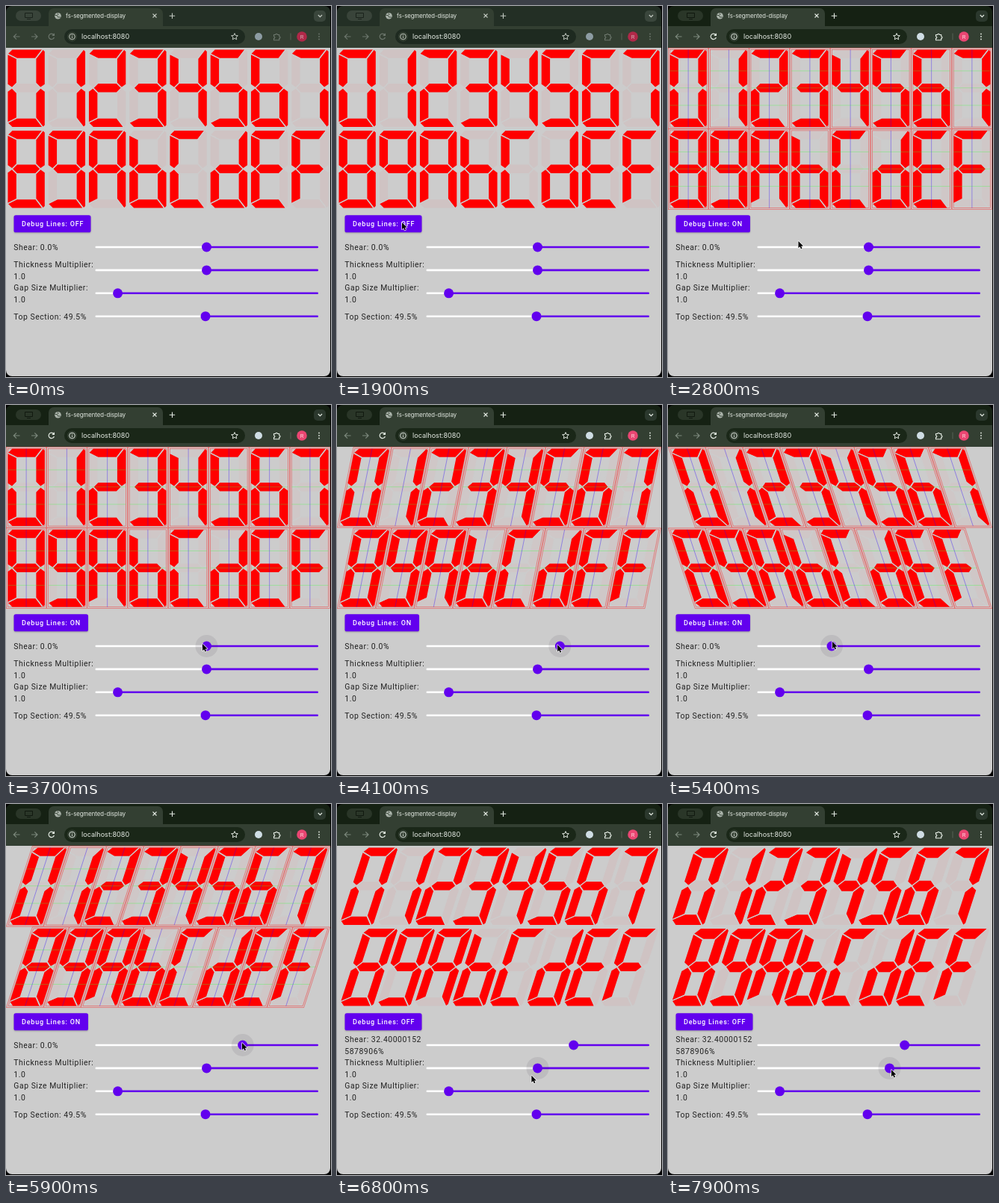
Write an HTML page with a canvas that moves like this. It is 435 px wide and 497 px high and loops after 8 s.

```html
<!DOCTYPE html>
<html lang="en">
<head>
<meta charset="utf-8">
<title>fs-segmented-display</title>
<style>
html, body { margin: 0; width: 100%; height: 100%; overflow: hidden; background: #000; }
canvas { display: block; }
</style>
</head>
<body>
<canvas id="stage" width="435" height="497"></canvas>
<script>
const ctx = document.getElementById('stage').getContext('2d');
const LOOP = 8000, STEP = 100;
const W = 434, CELL_H = 108.5, TOP = 56, INSET = 1.7, THICK = 12.9, SPLIT = 0.495;
const PAGE = '#cccccc', PURPLE = '#6200ee';
const SHEAR_MID = 268.5, HALF_TRACK = 149;
const FOCUS = 2000, DEBUG_ON = 2500, DEBUG_OFF = 6400;

// Lit segments of 0-9, A, b, C, d, E, F
const DIGITS = ['abcdef', 'bc', 'abdeg', 'abcdg', 'bcfg', 'acdfg', 'acdefg', 'abc',
  'abcdefg', 'abcdfg', 'abcefg', 'cdefg', 'adef', 'bcdeg', 'adefg', 'aefg'];

// Keyframes: time, then values
const POINTER = [[700, 408, 380], [1300, 244, 260], [1450, 244, 260], [1900, 87, 290],
  [2500, 87, 290], [3100, 262, 340], [3500, 263, 320], [3700, 263, 320], [4600, 340, 323],
  [4700, 337, 324], [5300, 216, 317], [5400, 220, 317], [5900, 316, 320], [6300, 62, 292],
  [6500, 62, 292], [6850, 272, 368], [7100, 272, 357], [7900, 299, 356]];
const SHEAR = [[3700, SHEAR_MID], [4600, 340], [4700, 337], [5300, 215], [5400, 219], [5900, 316.7]];
const THICKNESS = [[7100, 268.5], [7900, 296.5]];

function track(keys, t) {
  if (t <= keys[0][0]) return keys[0].slice(1);
  const i = keys.findIndex(k => k[0] > t);
  if (i < 0) return keys[keys.length - 1].slice(1);
  const a = keys[i - 1], b = keys[i];
  const u = (t - a[0]) / (b[0] - a[0]), e = u * u * (3 - 2 * u);
  return a.slice(1).map((v, n) => v + (b[n + 1] - v) * e);
}

function poly(points, fill, stroke, width = 1) {
  ctx.beginPath();
  points.forEach(([x, y]) => ctx.lineTo(x, y));
  ctx.closePath();
  if (fill) { ctx.fillStyle = fill; ctx.fill(); }
  if (stroke) { ctx.strokeStyle = stroke; ctx.lineWidth = width; ctx.stroke(); }
}

function box(x, y, w, h, r, fill) {
  ctx.beginPath();
  ctx.roundRect(x, y, w, h, r);
  ctx.fillStyle = fill;
  ctx.fill();
}

function disc(x, y, r, fill) {
  ctx.beginPath();
  ctx.arc(x, y, r, 0, 2 * Math.PI);
  ctx.fillStyle = fill;
  ctx.fill();
}

function line(d, color, width = 1.1) {
  ctx.strokeStyle = color;
  ctx.lineWidth = width;
  ctx.stroke(new Path2D(d));
}

function text(str, x, y, font, fill, spacing = 0) {
  ctx.font = font;
  ctx.letterSpacing = spacing + 'px';
  ctx.fillStyle = fill;
  ctx.fillText(str, x, y);
}

function segments(w, thick) {
  const l = INSET, r = w - INSET, t = INSET, b = CELL_H - INSET;
  const mid = t + (b - t) * SPLIT, half = thick / 2, c = 3;
  const li = l + thick, ri = r - thick, ti = t + thick, bi = b - thick;
  const out = thick * 0.36;
  return {
    a: [[l, t + half], [l + half, t], [r - c, t], [ri, ti], [li, ti]],
    b: [[r - c, t], [r, t + c], [r, mid - out], [r - half, mid], [ri, mid - half], [ri, ti]],
    c: [[r - half, mid], [r, mid + out], [r, b - c], [r - c, b], [ri, bi], [ri, mid + half]],
    d: [[l, b - half], [l + half, b], [r - c, b], [ri, bi], [li, bi]],
    e: [[l + half, mid], [li, mid + half], [li, bi], [l, b - half], [l, mid + out]],
    f: [[l, t + half], [li, ti], [li, mid - half], [l + half, mid], [l, mid - out]],
    g: [[l + half, mid], [li, mid - half], [ri, mid - half], [r - half, mid], [ri, mid + half], [li, mid + half]]
  };
}

// Cell, margin, and the centre lines of the middle bar and of both openings
function debugLines(w) {
  const mid = INSET + (CELL_H - 2 * INSET) * SPLIT;
  const upper = (INSET + THICK / 2 + mid) / 2, lower = (CELL_H - INSET - THICK / 2 + mid) / 2;
  ctx.lineWidth = 0.6;
  ctx.strokeStyle = 'rgba(255,0,0,.6)';
  ctx.strokeRect(0.4, 0.4, w - 0.8, CELL_H - 0.8);
  ctx.strokeRect(2.4, 2.4, w - 4.8, CELL_H - 4.8);
  for (const y of [upper, mid, lower]) line(`M2.400 ${y}H${w - 2.4}`, 'rgba(60,255,60,.45)', 0.7);
  line(`M${w / 2} 2.400V${CELL_H - 2.4}`, 'rgba(40,0,255,.5)', 0.7);
}

function drawDigits(shear, mult, debug) {
  const w = (W - Math.abs(shear) * CELL_H) / 8;
  const shapes = segments(w, THICK * mult);
  const unlit = debug ? '#cfc7c7' : '#cfc3c3';
  DIGITS.forEach((lit, i) => {
    ctx.save();
    ctx.transform(1, 0, -shear, 1, (i % 8) * w + Math.max(shear, 0) * CELL_H, TOP + (i >> 3) * CELL_H);
    for (const s in shapes) poly(shapes[s], lit.includes(s) ? '#ff0000' : unlit, PAGE, 1.5);
    if (debug) debugLines(w);
    ctx.restore();
  });
}

function drawBrowser(focused) {
  const ink = focused ? '#e3eae2' : '#c3cac2', dim = focused ? '#7d897d' : '#6c766c';
  const bar = '#333f32', strip = focused ? '#152113' : '#232f25';
  box(0, 0, W, 70, [8, 8, 0, 0], strip);
  box(13, 6, 34, 14, 7, focused ? '#2a3628' : '#39443a');
  line('M25.500 9.500h10v6h-10zM28 17.500h5', focused ? '#10180f' : '#1a221b', 1);
  box(57, 3, 153, 30, [7, 7, 0, 0], bar);
  box(0, 27, W, 29, 0, bar);

  disc(69.5, 13.3, 4.3, '#aab3aa');
  line('M65.500 12.500h3l1 2.500h3.500M69 9.500l1 2.500', bar, 0.9);
  text('fs-segmented-display', 80, 16, '7.7px Inter, sans-serif', '#e6ece5');
  line('M196.500 10.500l5 5M201.500 10.500l-5 5M222.500 9.500v7.500M218.700 13.300h7.500', ink);
  box(412, 6, 16, 15, 5, focused ? '#2b382d' : '#3a463c');
  line('M417.800 12l2.600 2.600l2.600-2.600', ink, 1.2);

  line('M18.500 41h-8M14 37.300L10.300 41l3.700 3.700', dim, 1.2);
  line('M34 41h8M38.300 37.300L42 41l-3.700 3.700', dim, 1.2);
  line('M63.700 38.500A3.700 3.700 0 1 0 64.400 42M64.400 36.800v2.500h-2.700', focused ? ink : dim, 1.2);
  box(78, 31, 242, 20, 10, focused ? '#1a2718' : '#1e2a20');
  disc(88.5, 41, 6.5, bar);
  line('M92.300 41a3.800 3.800 0 1 1-7.600 0a3.800 3.800 0 1 1 7.600 0M88.500 40.500v2.500M88.500 38.600v1', ink, 0.9);
  text('localhost:8080', 101, 44.3, '9.1px Inter, sans-serif', '#e6ece5');

  const star = Array.from({ length: 10 }, (_, i) => {
    const a = (i / 5 - 0.5) * Math.PI, r = i % 2 ? 2.1 : 4.6;
    return [306 + r * Math.cos(a), 41.2 + r * Math.sin(a)];
  });
  poly(star, null, ink, 1);
  disc(338, 41, 5, focused ? '#cfdde4' : '#8d9ca3');
  line('M358.500 38.500h2.300a1.300 1.300 0 1 1 2.600 0h2.300v2.300a1.300 1.300 0 1 1 0 2.600v2.300h-7.200v-2.300a1.300 1.300 0 1 0 0-2.600z', focused ? ink : dim, 1.1);
  line('M381 36.500v9', '#566355', 1);
  disc(396, 41, 6.8, focused ? '#ea4672' : '#b02848');
  ctx.textAlign = 'center';
  text('R', 396, 43.7, '7.5px Roboto, sans-serif', focused ? '#ffd9e0' : '#d3b0b7');
  ctx.textAlign = 'left';
  for (const y of [37.5, 41, 44.5]) disc(419, y, 0.9, focused ? ink : dim);
}

function drawButton(debug) {
  ctx.save();
  ctx.shadowColor = 'rgba(0,0,0,.25)';
  ctx.shadowBlur = 2;
  ctx.shadowOffsetY = 1;
  box(10.5, 280.3, debug ? 99.5 : 103, 23, 2.6, PURPLE);
  ctx.restore();
  text('Debug Lines: ' + (debug ? 'ON' : 'OFF'), 21, 295, '500 9px Roboto, sans-serif', '#fff', 0.8);
}

function drawSlider(y, x, lines, halo) {
  const base = lines.length > 1 ? y - 3.6 : y + 4.2;
  lines.forEach((s, i) => text(s, 10.3, base + i * 15.4, '10.4px Roboto, sans-serif', '#212121', 0.55));
  box(119.5, y - 1.3, x - 119.5, 2.6, 1.3, '#fff');
  box(x, y - 1.3, 418 - x, 2.6, 1.3, PURPLE);
  if (halo) disc(x, y, 15, 'rgba(60,50,70,.1)');
  disc(x, y, 6.5, PURPLE);
}

function drawPointer(x, y) {
  const arrow = [[0, 0], [0, 9.2], [2.1, 7.3], [3.5, 10.5], [5, 9.8], [3.7, 6.7], [6.5, 6.6]];
  ctx.save();
  ctx.translate(x, y);
  ctx.lineJoin = 'round';
  poly(arrow, null, 'rgba(255,255,255,.8)', 1.6);
  poly(arrow, '#000');
  ctx.restore();
}

function draw(t) {
  const debug = t >= DEBUG_ON && t < DEBUG_OFF;
  const [shearX] = track(SHEAR, t), [thickX] = track(THICKNESS, t);
  const shear = (shearX - SHEAR_MID) / HALF_TRACK;
  const mult = 1 + (thickX - SHEAR_MID) / HALF_TRACK;

  ctx.fillStyle = '#000';
  ctx.fillRect(0, 0, 435, 497);
  drawBrowser(t >= FOCUS);
  box(0, TOP, W, 440, [0, 0, 8, 8], PAGE);
  drawDigits(shear, mult, debug);
  drawButton(debug);
  // Labels refresh only when the button is pressed
  const label = t < DEBUG_OFF ? ['Shear: 0.0%'] : ['Shear: 32.40000152', '5878906%'];
  drawSlider(323, shearX, label, t >= 3300 && t < 6000);
  drawSlider(353.9, thickX, ['Thickness Multiplier:', '1.0'], t >= 6800);
  drawSlider(384.8, 149.6, ['Gap Size Multiplier:', '1.0']);
  drawSlider(415.7, 267, ['Top Section: 49.5%']);
  if (t >= POINTER[0][0]) drawPointer(...track(POINTER, t));
}

const start = performance.now();
function tick() {
  const t = (performance.now() - start) % LOOP;
  draw(Math.floor(t / STEP) * STEP);
  requestAnimationFrame(tick);
}
tick();
</script>
</body>
</html>
```
